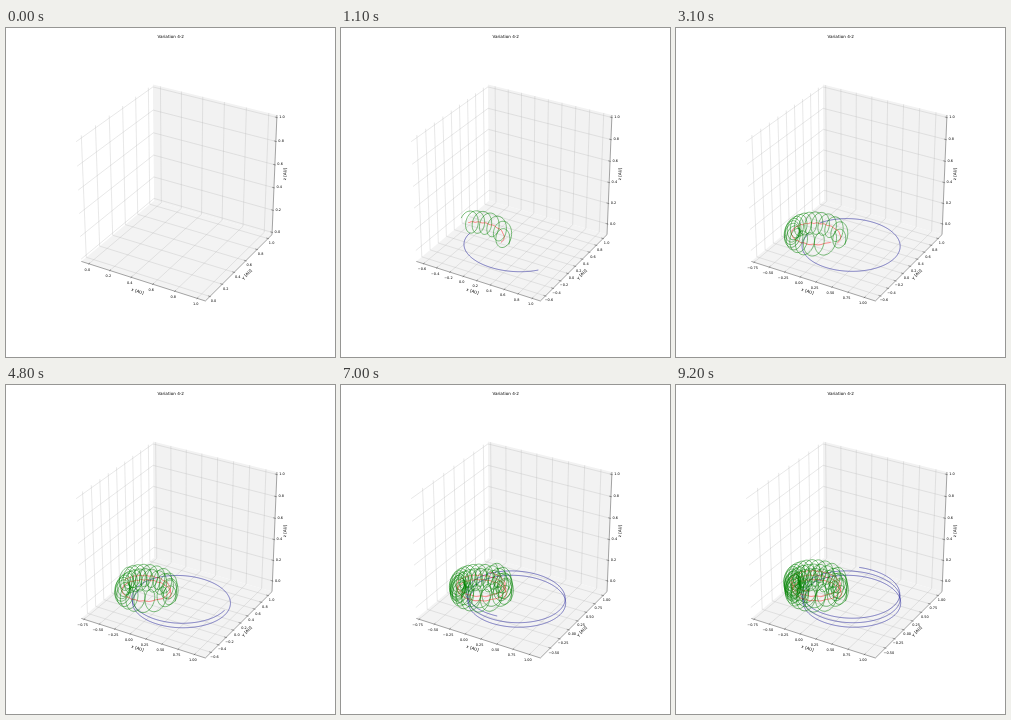
Write an HTML page with a canvas that moves like this. It is 329x329 px and loops after 9.3 s.

```html
<!DOCTYPE html>
<html>
<head>
<meta charset="utf-8">
<style>
html, body { margin: 0; width: 100%; height: 100%; overflow: hidden; background: #fff }
canvas { display: block }
</style>
</head>
<body>
<canvas id="stage" width="329" height="329"></canvas>
<script>
const ctx = document.getElementById('stage').getContext('2d');
const STEPS = 93, STEP_MS = 100, SAMPLES = 24;
const EDGE = 0.5 + 1 / 48;
const FONT = '"DejaVu Sans", sans-serif';

// Perspective view of a unit cube: elevation 30°, azimuth -60°
function project([x, y, z]) {
  const right = 0.866 * x + 0.5 * y;
  const up = -0.25 * x + 0.433 * y + 0.866 * z;
  const depth = 10 - (0.433 * x - 0.75 * y + 0.5 * z);
  return [172.2 + 1375 * right / depth, 160.9 - 1340 * up / depth];
}

// Two bodies around their common centre; the heavier one has a companion
function bodies(t) {
  const a = 0.69, b = 0.61, e = 0.51, mean = 2 * Math.PI * t / 32;
  let E = mean;
  for (let i = 0; i < 8; i++) E -= (E - e * Math.sin(E) - mean) / (1 - e * Math.cos(E));
  const x = -a * (Math.cos(E) - e);
  const y = -b * Math.sin(E);
  const dy = -0.0005 * t, dz = 0.0015 * t;
  const spin = 2 * Math.PI * t / 1.7;
  const c = Math.cos(spin), s = Math.sin(spin);
  const inner = k => [-x / 2 - 0.035 + 0.115 * k * c, -y / 2 + 0.07 * k * s + dy, 0.085 * k * s + dz];
  return [[x, y + dy, dz], inner(-0.03), inner(1)];
}

const track = Array.from({ length: STEPS * SAMPLES }, (_, i) => bodies(i / SAMPLES));
const COLORS = ['#00008b', '#ff0000', '#008000'];

// Axis limits grow with the data; x and y keep a 5% margin
function limits(points) {
  return [0, 1, 2].map(axis => {
    let lo = 0, hi = 1;
    for (const set of points) for (const p of set) {
      lo = Math.min(lo, p[axis]);
      hi = Math.max(hi, p[axis]);
    }
    const margin = axis < 2 ? 0.05 * (hi - lo) : 0;
    return [lo - margin, hi + margin];
  });
}

function path(points, color, width) {
  ctx.beginPath();
  for (const p of points) ctx.lineTo(...project(p));
  ctx.strokeStyle = color;
  ctx.lineWidth = width;
  ctx.stroke();
}

function fillPane(points, color) {
  ctx.beginPath();
  for (const p of points) ctx.lineTo(...project(p));
  ctx.fillStyle = color;
  ctx.fill();
}

function text(str, x, y, size, angle = 0) {
  ctx.save();
  ctx.translate(x, y);
  ctx.rotate(angle * Math.PI / 180);
  ctx.font = `${size}px ${FONT}`;
  ctx.textAlign = 'center';
  ctx.textBaseline = 'middle';
  ctx.fillStyle = '#000';
  ctx.fillText(str, 0, 0);
  ctx.restore();
}

const L = -EDGE, H = EDGE;
const AXES = [
  { grid: v => [[v, L, L], [v, H, L], [v, H, H]], at: v => [v, L, L], tick: [0, 1, 0],
    offset: [-1.5, 5.8], label: ['x [AU]', 131.5, 263.5, 17.6] },
  { grid: v => [[H, v, L], [L, v, L], [L, v, H]], at: v => [H, v, L], tick: [-1, 0, 0],
    offset: [3.5, 4.6], label: ['y [AU]', 241, 246.5, -45] },
  { grid: v => [[L, L, v], [L, H, v], [H, H, v]], at: v => [H, H, v], tick: [-1, 0, 0],
    offset: [5.2, -0.3], label: ['z [AU]', 279.2, 146, -87.6] }
];

function ticks([lo, hi]) {
  const step = hi - lo > 1.8 ? 0.25 : 0.2, list = [];
  for (let i = Math.ceil(lo / step - 1e-6); i * step <= hi + 1e-6; i++) {
    const str = Math.abs(i * step).toFixed(step === 0.25 ? 2 : 1);
    list.push({ pos: (i * step - lo) / (hi - lo) - 0.5, str: (i < 0 ? '\u2212' : '') + str });
  }
  return list;
}

function draw(n) {
  const shown = track.slice(0, n * SAMPLES + (n ? 1 : 0));
  const lims = limits(shown);
  const marks = lims.map(ticks);
  ctx.fillStyle = '#fff';
  ctx.fillRect(0, 0, 329, 329);

  fillPane([[L, H, L], [H, H, L], [H, H, H], [L, H, H]], '#f2f2f2');
  fillPane([[L, L, L], [H, L, L], [H, H, L], [L, H, L]], '#f3f3f3');
  AXES.forEach((axis, i) => marks[i].forEach(m => path(axis.grid(m.pos), '#b0b0b0', 0.3)));

  AXES.forEach((axis, i) => {
    path([axis.at(L), axis.at(H)], '#000', 0.35);
    for (const m of marks[i]) {
      const p = axis.at(m.pos);
      const shift = k => p.map((v, j) => v + k * axis.tick[j]);
      path([shift(-0.008), shift(0.016)], '#000', 0.3);
      const [x, y] = project(p);
      text(m.str, x + axis.offset[0], y + axis.offset[1], 3.47);
    }
    const [str, x, y, angle] = axis.label;
    text(str, x, y, 4.1, angle);
  });

  COLORS.forEach((color, b) => {
    const line = shown.map(set => set[b].map((v, i) => (v - lims[i][0]) / (lims[i][1] - lims[i][0]) - 0.5));
    path(line, color, 0.5);
  });
  text('Variation 4-2', 164.7, 9, 4.17);
}

function frame() {
  draw(Math.floor(performance.now() / STEP_MS) % STEPS);
  requestAnimationFrame(frame);
}
frame();
</script>
</body>
</html>
```
